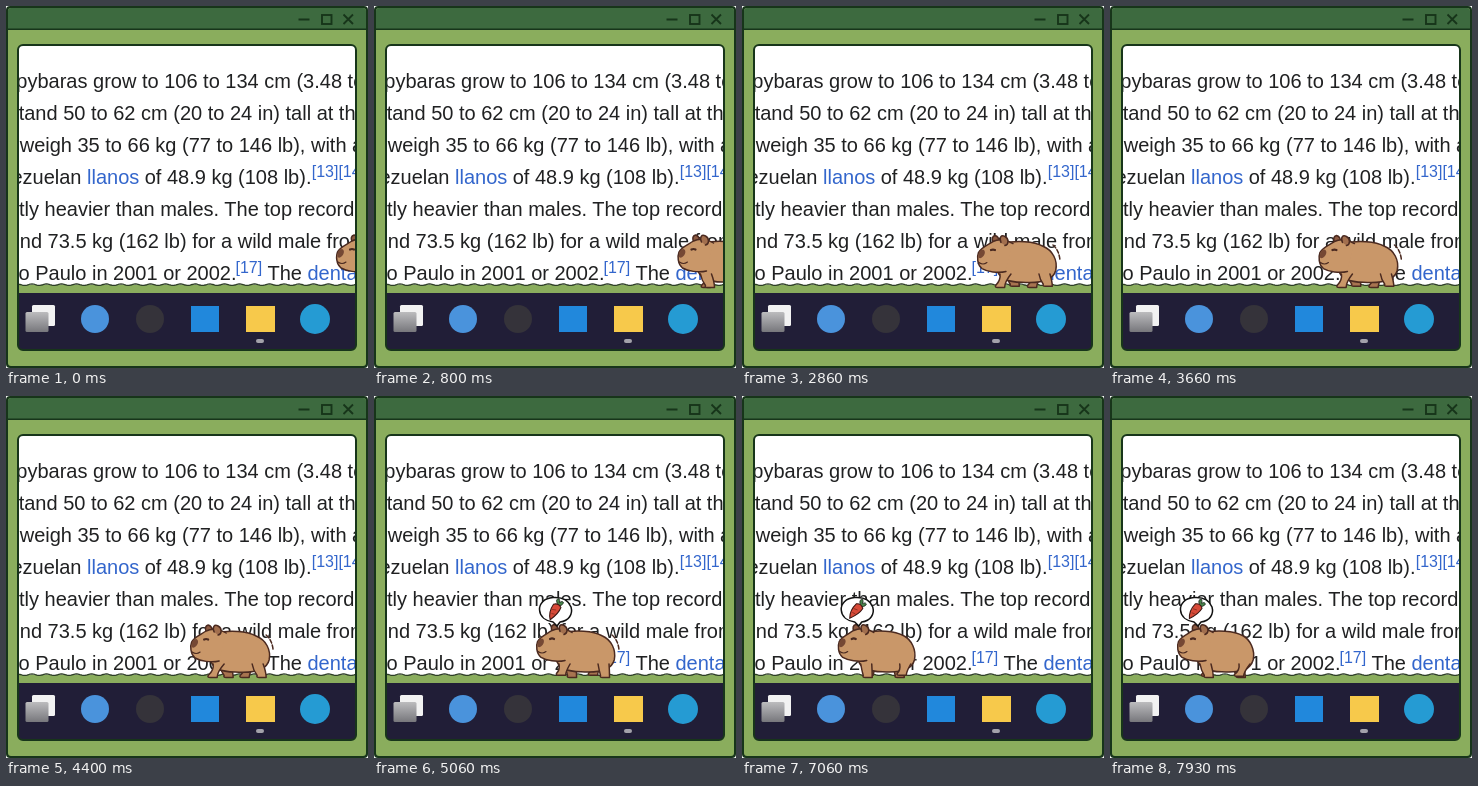
Write an HTML page that moves like this. It is 362 px wide and 362 px high and loops after 8 s.

```html
<!DOCTYPE html>
<html lang="en">
<head>
<meta charset="utf-8">
<title>Capybara window</title>
<style>
html, body { margin: 0; width: 100%; height: 100%; overflow: hidden; background: #fff; }
svg { display: block; width: 100%; height: 100%; }
text { font: 20px "Liberation Sans", Arial, sans-serif; fill: #202122; white-space: pre; }
.link { fill: #3366cc; }
.sup { font-size: 16px; fill: #3366cc; }
.edge { fill: none; stroke: #17351a; }
.ink { stroke: #4b2a20; stroke-width: 1.5; stroke-linejoin: round; stroke-linecap: round; }
</style>
</head>
<body>
<svg viewBox="0 0 362 362">
  <defs>
    <clipPath id="panel"><rect x="12" y="39" width="338" height="305" rx="5"/></clipPath>
    <linearGradient id="pane" x2="0" y2="1">
      <stop stop-color="#bcbcbe"/><stop offset="1" stop-color="#77777c"/>
    </linearGradient>
  </defs>
  <rect width="362" height="362" rx="4" fill="#17351a"/>
  <rect x="2" y="2" width="358" height="358" rx="3" fill="#8aad5d"/>
  <path d="M2 23V5q0-3 3-3H357q3 0 3 3V23z" fill="#3d6a3f"/>
  <path class="edge" d="M1 23.300H361" stroke-width="1.600"/>
  <g class="edge" stroke-width="1.9">
    <path d="M292.500 13.500h11M337.500 8.500l9.500 9.500m0-9.500l-9.500 9.500"/>
    <rect x="316" y="9" width="9.500" height="9"/>
  </g>

  <g clip-path="url(#panel)">
    <rect x="12" y="39" width="338" height="305" fill="#fff"/>
    <g id="copy"></g>
    <rect x="12" y="279" width="338" height="9" fill="#8aad5d"/>
    <path id="rough" fill="none" stroke="#2c3d25" stroke-width="1.300"/>
    <rect x="12" y="287" width="338" height="58" fill="#211e37"/>
    <rect x="26" y="299" width="23" height="21" rx="1.500" fill="#f2f2f2"/>
    <rect x="19.500" y="306" width="23" height="20" rx="1.500" fill="url(#pane)"/>
    <circle cx="89" cy="313" r="14" fill="#4a93dc"/>
    <circle cx="144" cy="313" r="14" fill="#35333a"/>
    <rect x="185" y="300" width="28" height="26" fill="#2188dc"/>
    <rect x="240" y="300" width="29" height="26" fill="#f7c94b"/>
    <circle cx="309" cy="313" r="15" fill="#259bd3"/>
    <rect x="250" y="333" width="8" height="4" rx="2" fill="#a3a2ab"/>

    <g id="capy">
      <g id="farLegs"></g>
      <path id="body" class="ink" fill="#c99769"/>
      <g id="nearLegs"></g>
      <g id="head" class="ink">
        <path d="M16 236q-2-6 2-7q4 1 4 6" fill="#8d5b42"/>
        <path d="M29 265C21 267 10 265 5 262C0 258 0 250 1.500 246C4 241 10 239 16 235C22 232 30 233 36 237" fill="#c99769"/>
        <path d="M1.500 251C1 246 3 243 6 243C9 244 8 248 6 250C4 252 3 252 1.500 251z" fill="#754834" stroke="none"/>
        <path d="M2 256q4 3 8 0" fill="none" stroke-width="1.1"/>
        <path d="M24 236C22 231 24 228 28 230C32 232 32 238 28 239" fill="#a26f4e"/>
        <path d="M14 243.500q2-1 4 0" fill="none" stroke-width="2.200"/>
      </g>
      <path id="wag" class="ink" fill="none" stroke-width="1.2" stroke-dasharray="4 2" d="M76 239q6 5 7 15"/>
      <g id="bubble">
        <path d="M17 226L21 230L24 226C33 225 37 218 35 211C32 203 24 201 17 201.500C8 202 3 208 3.500 214C4 221 10 225 17 226z" fill="#fff" stroke="#111" stroke-width="1.500" stroke-linejoin="round"/>
        <g id="carrot">
          <path d="M22 208q-2-5 2-5q1 2 0 4q4-2 4 1q-2 3-6 2" fill="#47834a" stroke="#1d2a1f" stroke-width=".8"/>
          <path d="M18 208q5-1 7 4q-3 6-12 11q-1-8 5-15z" fill="#d84a38" stroke="#3d1713" stroke-width="1.100"/>
          <path d="M16 213l4 1m-5 3l3 1" stroke="#832d20" stroke-width=".8"/>
        </g>
      </g>
    </g>
  </g>
  <rect class="edge" x="12" y="39" width="338" height="305" rx="5" stroke-width="2"/>
</svg>
<script>
const NS = "http://www.w3.org/2000/svg";
const $ = id => document.getElementById(id);
const LOOP = 8000, STEP = 1000 / 15, CYCLE = 12;

function add(parent, tag, attrs, content) {
  const el = document.createElementNS(NS, tag);
  for (const key in attrs) el.setAttribute(key, attrs[key]);
  if (content) el.textContent = content;
  parent.append(el);
  return el;
}

function write(x, y, words, cls = "") {
  add($("copy"), "text", { x, y, class: cls }, words);
}

write(10.3, 82, "pybaras grow to 106 to 134 cm (3.48 to");
write(12.7, 114, "tand 50 to 62 cm (20 to 24 in) tall at the");
write(13.7, 146, "weigh 35 to 66 kg (77 to 146 lb), with a");
write(5.4, 178, "ezuelan ");
write(81, 178, "llanos", "link");
write(138.7, 178, "of 48.9 kg (108 lb).");
write(305.7, 171, "[13][14]", "sup");
write(13, 210, "tly heavier than males. The top recorded");
write(13.8, 242, "nd 73.5 kg (162 lb) for a wild male from");
write(12.6, 274, "o Paulo in 2001 or 2002.");
write(229.5, 267, "[17]", "sup");
write(261.5, 274, "The");
write(301.5, 274, "dental", "link");

let edge = "M12 279";
for (let x = 13; x <= 350; x++) {
  edge += `L${x} ${(278.7 + Math.sin(x * 12.99) * 0.7).toFixed(1)}`;
}
$("rough").setAttribute("d", edge);

const makeLeg = (group, fill) => add($(group), "path", { class: "ink", fill });
const legs = [
  { el: makeLeg("farLegs", "#a87450"), x: 34, shift: 0.5 },
  { el: makeLeg("farLegs", "#a87450"), x: 60, shift: 0 },
  { el: makeLeg("nearLegs", "#c99769"), x: 28, shift: 0 },
  { el: makeLeg("nearLegs", "#c99769"), x: 67, shift: 0.5 }
];

function drawLeg({ el, x, shift }, phase) {
  const angle = (phase + shift) * 2 * Math.PI;
  const foot = x + Math.cos(angle) * 5;
  const y = 281.5 - Math.max(0, Math.sin(angle)) * 2.5;
  el.setAttribute("d", `M${x - 5} 268Q${x - 4} 274 ${foot - 5} ${y - 2}` +
    `Q${foot - 6} ${y} ${foot - 3} ${y}H${foot + 4}Q${foot + 4} 276 ${x + 6} 268`);
}

function render(time) {
  const tick = Math.floor((time % LOOP + 6.7) / STEP) % 120;
  const beat = tick % CYCLE, phase = beat / CYCLE;
  const left = 330 - tick * 2.21;
  const stretch = 1.5 * Math.cos((phase - 0.5) * 2 * Math.PI);
  const bob = Math.sin(phase * 4 * Math.PI) * 0.6;
  const rear = 78.5 + stretch;

  $("capy").setAttribute("transform", `translate(${left.toFixed(2)} 0)`);
  $("body").setAttribute("d", `M25 237C40 234 57 235 66 240` +
    `C${rear - 4} 244 ${rear + 1} 254 ${rear - 1} 264C${rear - 4} 276 59 277 45 276` +
    `C32 276 22 273 20 263C19 254 20 243 25 237Z`);
  $("body").setAttribute("transform", `translate(0 ${bob * 0.5})`);
  $("head").setAttribute("transform", `translate(0 ${bob})`);
  legs.forEach(leg => drawLeg(leg, phase));

  $("wag").style.display = beat >= 4 && beat <= 7 ? "" : "none";
  $("bubble").style.display = tick >= 70 ? "" : "none";
  const tilt = Math.sin(phase * 2 * Math.PI) * -7;
  $("carrot").setAttribute("transform", `rotate(${tilt} 20 213)`);
}

const start = performance.now();
function play(now) {
  render(Math.max(0, now - start));
  requestAnimationFrame(play);
}
render(0);
requestAnimationFrame(play);
</script>
</body>
</html>
```
